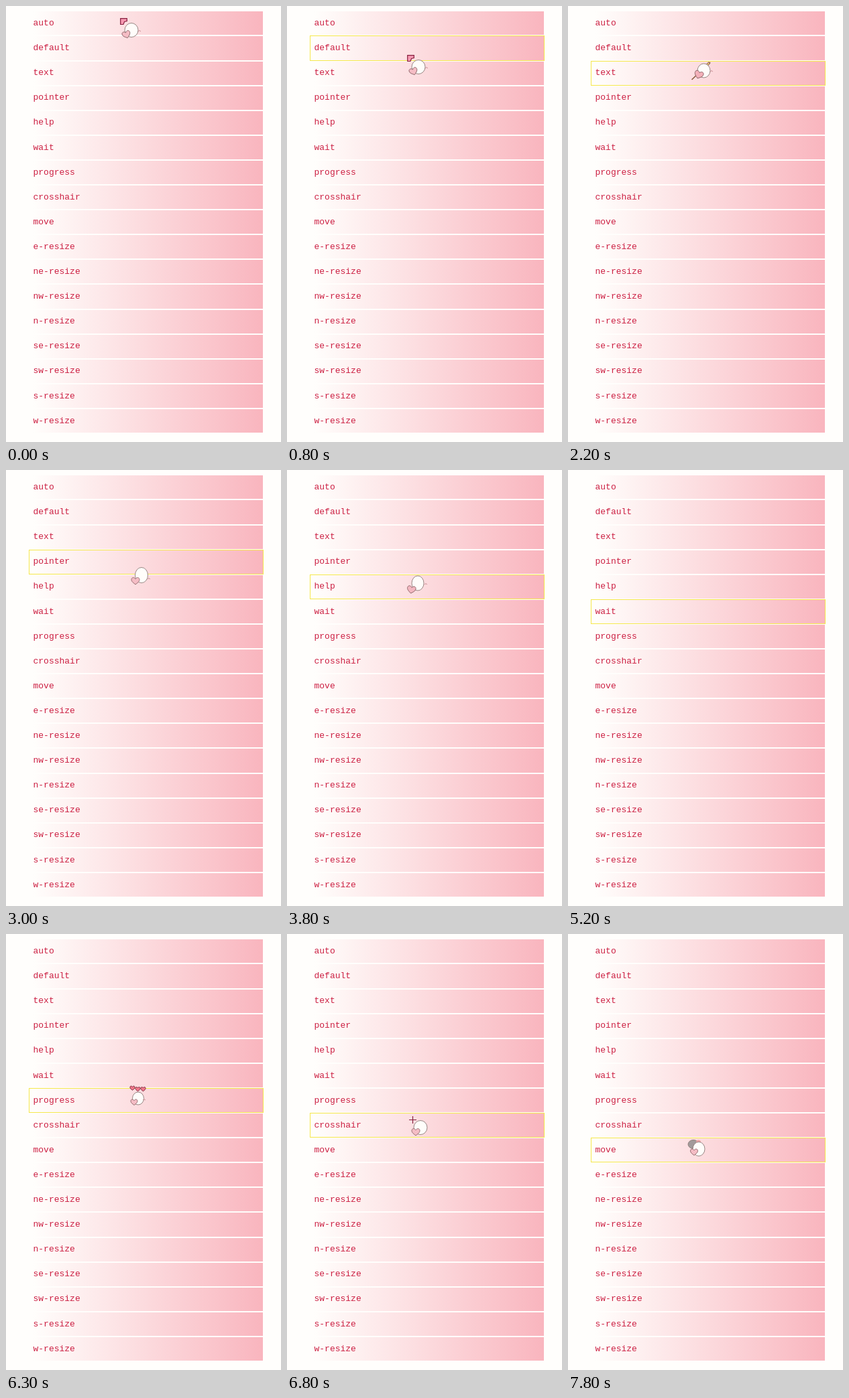
Animation, 410 px wide and 651 px high, one loop 8 s. Source, as an HTML page:

```html
<!DOCTYPE html>
<html lang="en">
<head>
<meta charset="utf-8">
<title>Cursor list</title>
<style>
  html, body { margin: 0; width: 100%; height: 100%; overflow: hidden; background: #fffefc; }
  svg { display: block; }
  text { font: 13px "Liberation Mono", "Courier New", monospace; fill: #cc1f42; }
</style>
</head>
<body>
<svg width="410" height="651" viewBox="0 0 410 651">
  <defs>
    <linearGradient id="fade" gradientUnits="userSpaceOnUse" x1="40" x2="383">
      <stop stop-color="#fffefc"/>
      <stop offset="1" stop-color="#f9b5be"/>
    </linearGradient>
  </defs>
  <g id="rows"></g>
  <rect id="outline" x="34.5" width="349" fill="none" stroke="#f5e84c"/>
  <g id="cursor"></g>
</svg>
<script>
const LOOP = 8000;
const names = ['auto', 'default', 'text', 'pointer', 'help', 'wait', 'progress', 'crosshair', 'move',
  'e-resize', 'ne-resize', 'nw-resize', 'n-resize', 'se-resize', 'sw-resize', 's-resize', 'w-resize'];
const [rows, outline, cursor] = ['rows', 'outline', 'cursor'].map(id => document.getElementById(id));
const edge = i => Math.round(7.3 + 37.1 * i);

rows.innerHTML = names.map((name, i) =>
  `<rect x="40" y="${edge(i) + 1}" width="343" height="${edge(i + 1) - edge(i) - 2}" fill="url(#fade)"/>
   <text x="40.5" y="${29 + 37.1 * i}">${name}</text>`).join('');

// Shapes, placed by their centre
const blob = (x, y, rx, ry, fill = '#fffdfa') =>
  `<ellipse cx="${x}" cy="${y}" rx="${rx}" ry="${ry}" fill="${fill}" stroke="#8d7b78" stroke-width=".9"/>`;
const heart = (x, y, size = 6, fill = '#f5bdc5', line = '#8d6468', turn = 0) =>
  `<path transform="translate(${x} ${y}) rotate(${turn}) scale(${size})" fill="${fill}" stroke="${line}"
    stroke-width="${.9 / size}" d="M0 .9C-.5 .5-1 .2-1-.3C-1-.9-.3-1 0-.45C.3-1 1-.9 1-.3C1 .2 .5 .5 0 .9Z"/>`;
const line = (d, color, width = 1) =>
  `<path d="${d}" fill="none" stroke="${color}" stroke-width="${width}"/>`;
const tick = (x, y) => line(`M${x} ${y}q2-3 4 0`, '#c98f94');

// Cursors, in coordinates from their top left corner
const pointerTip = '<path d="M.7 .7H10.3V4.5L6.5 5.5L5 9.5H.7Z" fill="#f79ab3" stroke="#86203f" stroke-width="1.2"/>';
const arrow = pointerTip + blob(17, 18, 10, 10.5) + heart(9.5, 24.5, 6, '#f5bdc5', '#8d6468', -20) + tick(27, 20);
const rod = line('M.5 27L28 1', '#8a5a3c', 1.6) + line('M23 5.5L27 1.5', '#6b4a3a', 3.4) + line('M23.5 5L26.5 2', '#f2c27c', 1.8) +
  blob(18.5, 13.5, 9.5, 10.5) + heart(11, 19.5, 6.5, '#f3b0b9', '#8d6468', 20) + tick(28, 15);
const hand = flick => blob(16, 13, 9.5, 11.5) + heart(7, 21.5) + (flick ? tick(25, 19) : '');
const ask = (x, y) => blob(16, 12, 9, 11) + heart(x, y, 6.3, '#f3b7c0', '#8d6468', 10) + tick(26, 14);
const rest = blob(15, 13, 10, 11) + heart(8, 20);
const hearts = shown => blob(13, 17.5, 8.5, 9.5) + heart(7, 23, 5) + tick(20, 20) +
  shown.map(i => heart(4.5 + 8 * i, i ? 3.5 : 2, 3.6, '#f3798c', '#6f2236')).join('');
const cross = line('M5.5 0V11M0 5.5H11', '#86203f', 1.2) + blob(17, 17, 10, 10.5) + heart(10, 23.5);
const drag = blob(8, 7, 8, 6.5, '#a29a9a') + '<circle cx="15.5" cy="4" r="3.6" fill="#eba3a6"/>' +
  blob(16, 14, 9, 10.5) + heart(9, 18.5, 5.5);

// [start ms, lit row, x, y, cursor]
const poses = [
  [0, -1, 170, 18, arrow],
  [500, 1, 174, 33, arrow], [700, 1, 177, 57, arrow], [800, 1, 179, 73, arrow],
  [1600, 1, 181, 79, arrow], [1700, 2, 183, 87, rod], [2200, 2, 184, 83, rod],
  [2300, 3, 0, 0, ''], [2600, 3, 186, 144, hand(false)], [3000, 3, 186, 144, hand(true)],
  [3300, 3, 186, 150, hand(true)], [3400, 4, 0, 0, ''],
  [3600, 4, 179, 157, ask(8, 18.5)], [3800, 4, 179, 157, ask(6.5, 21.5)], [4100, 4, 179, 157, ask(8.5, 18.5)],
  [4300, 4, 180, 166, ask(8.5, 18.5)], [4400, 5, 0, 0, ''],
  [4900, 5, 182, 198, rest], [5200, 5, 0, 0, ''],
  [5500, 6, 0, 0, ''], [5900, 6, 184, 228, hearts([1])], [6100, 6, 184, 228, hearts([1, 2])],
  [6300, 6, 184, 228, hearts([0, 1, 2])], [6500, 6, 184, 234, hearts([0, 1, 2])],
  [6600, 6, 184, 243, hearts([0, 1, 2])], [6700, 7, 182, 268, cross], [6800, 7, 182, 272, cross],
  [7600, 7, 181, 275, cross], [7700, 8, 179, 304, drag], [7800, 8, 179, 307, drag],
];

let current;
function show(now) {
  const time = now % LOOP;
  const pose = poses.findLast(p => p[0] <= time);
  if (pose !== current) {
    current = pose;
    const [, row, x, y, shape] = pose;
    outline.setAttribute('visibility', row < 0 ? 'hidden' : 'visible');
    outline.setAttribute('y', edge(row) + .5);
    outline.setAttribute('height', edge(row + 1) - edge(row) - 1);
    cursor.setAttribute('transform', `translate(${x} ${y})`);
    cursor.innerHTML = shape;
  }
  requestAnimationFrame(show);
}
show(0);
</script>
</body>
</html>
```
